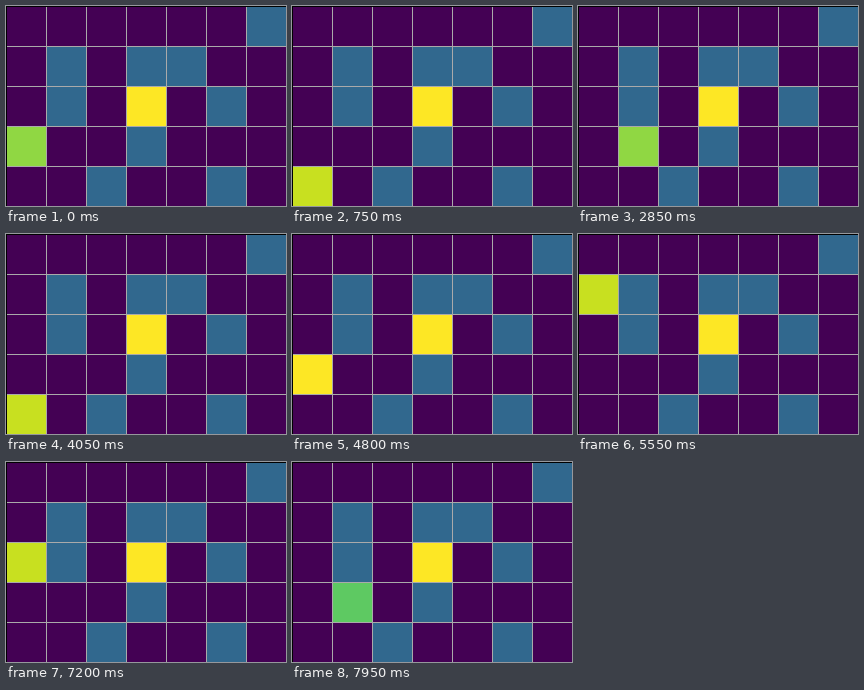
An HTML page with a canvas that plays this animation: 280x200 px, repeating every 8 s.

```html
<!DOCTYPE html>
<html>
<head>
<meta charset="utf-8">
<style>
html, body { margin: 0; width: 100%; height: 100%; overflow: hidden; background: #000; }
canvas { display: block; }
</style>
</head>
<body>
<canvas id="stage" width="280" height="200"></canvas>
<script>
const ctx = document.getElementById('stage').getContext('2d');
const SIZE = 40, STEP = 150, LOOP = 8000;
const MAP = [
  '......#',
  '.#.##..',
  '.#.G.#.',
  '...#...',
  '..#..#.'
];
const FILL = { '.': '#440154', '#': '#31688e', G: '#fde725' };
const MOVES = {
  U: { dx: 0, dy: -1, color: '#fde725' },
  D: { dx: 0, dy: 1, color: '#c8e020' },
  L: { dx: -1, dy: 0, color: '#90d743' },
  R: { dx: 1, dy: 0, color: '#5ec962' }
};
// One action per step; lowercase is a slip that leaves the agent in place.
const ACTIONS = 'DRULDLU RULUUDD RDURLLU DRRLLDU LUDuUUU LDDDUUL URDLDDL RDLR'.replace(/ /g, '');

const isFree = (x, y) => MAP[y] && MAP[y][x] && MAP[y][x] !== '#';

function agentAt(step) {
  let x = 0, y = 3, color = MOVES.L.color;
  for (const action of ACTIONS.slice(0, step)) {
    const move = MOVES[action.toUpperCase()];
    color = move.color;
    if (action in MOVES && isFree(x + move.dx, y + move.dy)) {
      x += move.dx;
      y += move.dy;
    }
  }
  return { x, y, color };
}

function cell(x, y, color) {
  ctx.fillStyle = color;
  ctx.fillRect(x * SIZE, y * SIZE, SIZE, SIZE);
}

function draw(time) {
  MAP.forEach((row, y) => [...row].forEach((type, x) => cell(x, y, FILL[type])));
  const agent = agentAt(Math.floor((time % LOOP) / STEP));
  cell(agent.x, agent.y, agent.color);

  ctx.fillStyle = '#aaa';
  for (let x = SIZE; x < 280; x += SIZE) ctx.fillRect(x, 0, 1, 200);
  for (let y = SIZE; y < 200; y += SIZE) ctx.fillRect(0, y, 280, 1);
  ctx.fillStyle = '#000';
  ctx.fillRect(0, 0, 280, 1);
  ctx.fillRect(0, 0, 1, 200);
}

const start = performance.now();
function tick() {
  draw(performance.now() - start);
  requestAnimationFrame(tick);
}
tick();
</script>
</body>
</html>
```
